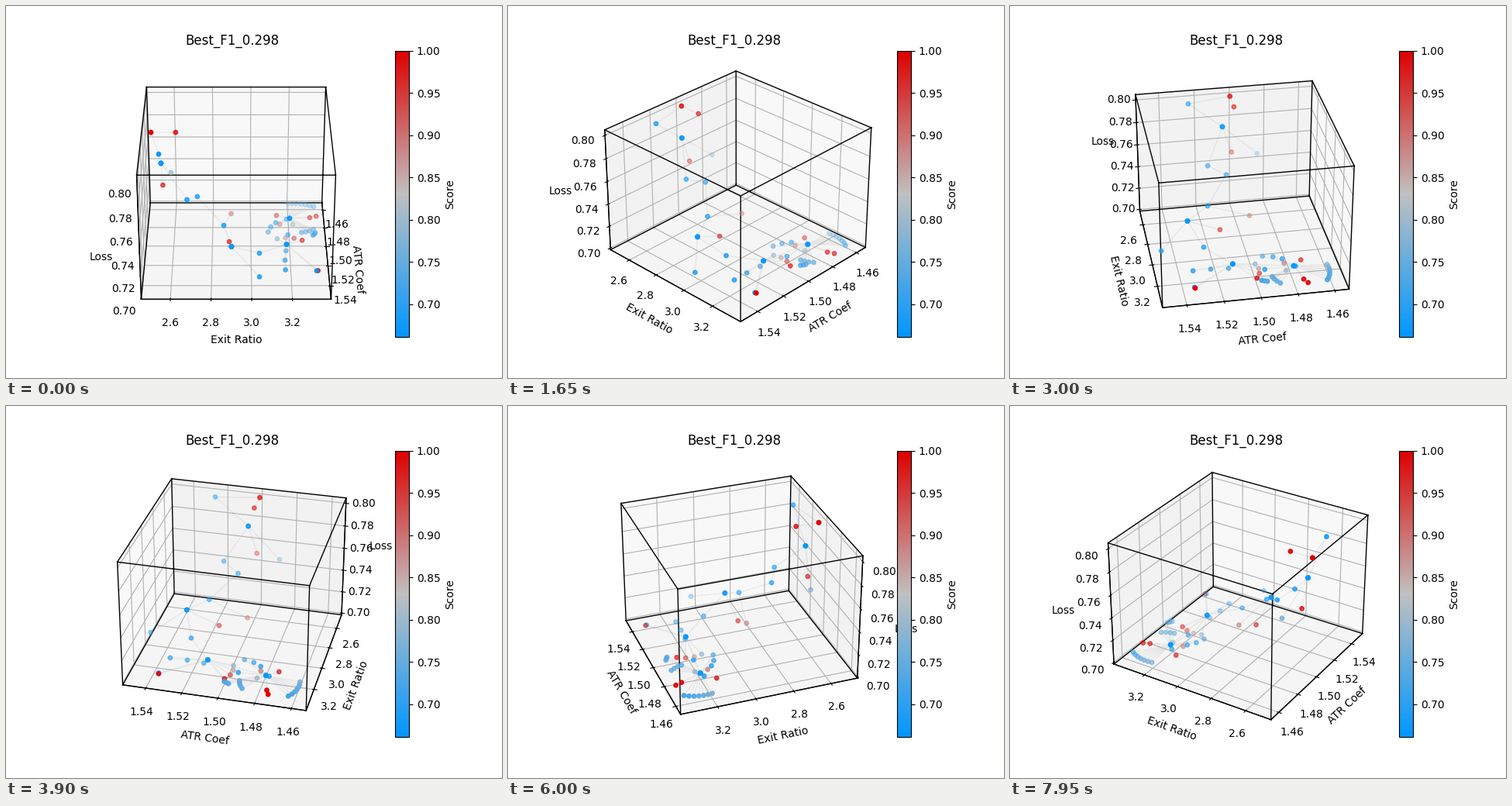
These frames come from a looping animation (640x480 px, 8 s). A matplotlib script:

```python
import itertools

import matplotlib.pyplot as plt
import numpy as np
from matplotlib.animation import FuncAnimation
from matplotlib.colors import LinearSegmentedColormap

FRAMES, INTERVAL = 160, 50
HOLD = 3            # ticks per rotation step
STEP_DEGREES = 4

LOW = np.array([1.45214, 2.4568, 0.6984])
HIGH = np.array([1.5530, 3.3901, 0.80467])
ASPECT = np.array([1190.5, 1190.5, 892.9])   # box sides; points use these units
FLOOR = -402
BEST = 0.67

# Main search path (ATR, exit, loss), measured from the box centre.
SPINE = [
    (-26, -541, 407), (262, -479, 407), (36, -479, 217), (163, -313, 23),
    (49, -250, -21), (202, -79, -145), (343, -30, -216), (265, 149, -315),
    (106, 328, -348), (-285, 360, -385),
]
START, FORK, BEND, TURN, NEAR_HUB, FAR_HUB = 0, 2, 5, 6, 8, 9

# Single side steps: parent, position, score.
SIDE_STEPS = [
    (START, (-26, -384, 407), 0.99), (FORK, (-191, -427, 21), 0.78),
    (FORK, (-25, -474, 22), 0.98), (BEND, (-68, -33, -219), 0.88),
    (TURN, (127, -45, -314), 0.98), (TURN, (541, 146, -315), 0.70),
]

# Spirals of trials: hub, angles, radii, count, loss, scores.
SPIRALS = [
    (NEAR_HUB, (-8, -3), (27, 255), 3, -380, (0.74, 0.70)),
    (NEAR_HUB, (142, 200), (175, 166), 4, FLOOR, (0.98, 0.79)),
    (NEAR_HUB, (34, 35.4), (330, 333), 2, -375, (BEST, 1.0)),
    (FAR_HUB, (-127, 20), (109, 57), 3, FLOOR, (0.97, 0.80)),
    (FAR_HUB, (-129, -5), (26, 186), 2, FLOOR, (0.69, 0.69)),
    (FAR_HUB, (-59, -40), (110, 230), 3, -385, (0.69, 0.74)),
    (FAR_HUB, (32, 39), (278, 262), 3, -374, (0.72, 0.74)),
    (FAR_HUB, (26, 53), (172, 196), 4, FLOOR, (0.74, 0.75)),
    (FAR_HUB, (105, 107), (143, 190), 2, FLOOR, (1.0, 1.0)),
    (FAR_HUB, (137, 181), (250, 220), 7, FLOOR, (0.72, 0.77)),
]


def to_data(position):
    return (LOW + HIGH) / 2 + np.asarray(position) / ASPECT * (HIGH - LOW)


def spiral(hub, angles, radii, count, loss, scores):
    """Yield side steps curling around a point of the spine."""
    x, y, _ = SPINE[hub]
    for angle, radius, score in zip(np.radians(np.linspace(*angles, count)),
                                    np.linspace(*radii, count),
                                    np.linspace(*scores, count)):
        yield hub, (x + radius * np.cos(angle), y + radius * np.sin(angle), loss), score


def draw_segments(ax, pairs, **style):
    """Draw separate 3D segments as one line broken by gaps."""
    gap = np.full(3, np.nan)
    path = np.array([p for a, b in pairs for p in (a, b, gap)])
    ax.plot(*path.T, **style)


def box_edges():
    corners = list(itertools.product(*zip(LOW, HIGH)))
    return [(a, b) for a, b in itertools.combinations(corners, 2)
            if sum(p != q for p, q in zip(a, b)) == 1]


steps = SIDE_STEPS + [step for row in SPIRALS for step in spiral(*row)]
spine = [to_data(p) for p in SPINE]
leaves = [to_data(p) for _, p, _ in steps]
links = list(zip(spine, spine[1:]))
links += [(spine[hub], leaf) for (hub, _, _), leaf in zip(steps, leaves)]

# Hubs were visited repeatedly, so their dots stack and stay opaque.
hubs = [spine[i] for i in (FORK, TURN, NEAR_HUB, FAR_HUB)] * 3
points = np.array(spine + leaves + hubs + [spine[START]])
scores = np.r_[1.0, np.full(len(spine) - 1, BEST), [s for *_, s in steps],
               np.full(len(hubs), BEST), 1.0]

fig = plt.figure(figsize=(6.4, 4.8), dpi=100)
ax = fig.add_subplot(projection="3d")

cmap = LinearSegmentedColormap.from_list("score", ["#0096ff", "#c0c0c0", "#dd0000"])
dots = ax.scatter(*points.T, c=scores, s=15, cmap=cmap, vmin=0.661, vmax=1.0)
draw_segments(ax, links, color="gray", alpha=0.12, lw=1)
draw_segments(ax, box_edges(), color="black", lw=1)

ax.set(xlim=(LOW[0], HIGH[0]), ylim=(LOW[1], HIGH[1]), zlim=(LOW[2], HIGH[2]),
       xlabel="ATR Coef", ylabel="Exit Ratio", zlabel="Loss",
       title="Best_F1_0.298")
ax.set_xticks(np.arange(1.46, 1.55, 0.02))
ax.set_yticks(np.arange(2.6, 3.3, 0.2))
ax.set_zticks(np.arange(0.70, 0.81, 0.02))
fig.colorbar(dots, ax=ax, label="Score")


def update(tick):
    ax.view_init(elev=30, azim=STEP_DEGREES * (tick // HOLD))
    return []


anim = FuncAnimation(fig, update, frames=FRAMES, interval=INTERVAL, repeat=True)
plt.show()
```
